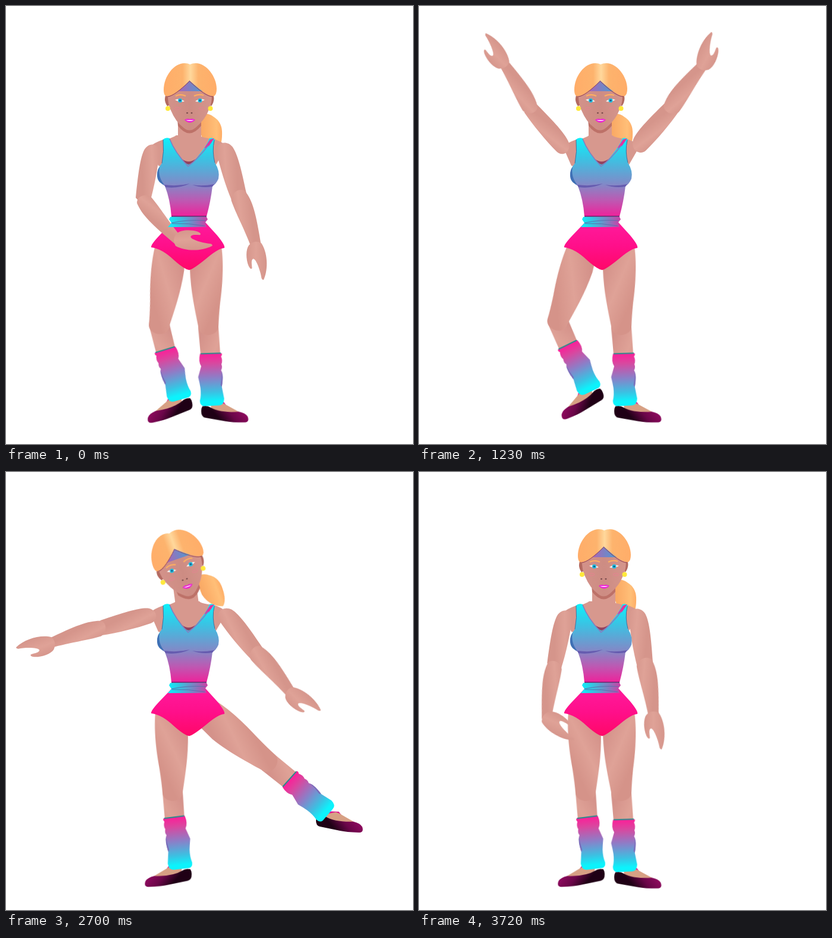
An HTML page that plays this animation: 684x735 px, repeating every 3.75 s.

```html
<!DOCTYPE html>
<html lang="en">
<head>
<meta charset="utf-8">
<title>Aerobics dancer</title>
<style>
html, body { margin: 0; width: 100%; height: 100%; overflow: hidden; background: #fff; }
svg { display: block; width: 684px; height: 735px; }
[class] { animation: 3750ms linear infinite; }

/* Right side: shoulder, elbow, wrist */
.rs { animation-name: rs; }
.re { animation-name: re; }
.rw { animation-name: rw; }
@keyframes rs {
  0% { rotate: -15.9deg; } 12.8% { rotate: -49.4deg; } 32.8% { rotate: -138.3deg; }
  38% { rotate: -158deg; } 46.4% { rotate: -20.8deg; } 61.6% { rotate: -47deg; }
  66.5% { rotate: -53deg; } 83.2%, 100% { rotate: -8.1deg; }
}
@keyframes re {
  0% { rotate: -3.1deg; } 12.8% { rotate: -9.2deg; } 32.8% { rotate: -5deg; }
  46.4% { rotate: -3deg; } 61.6% { rotate: -3.9deg; } 83.2%, 100% { rotate: -1.3deg; }
}
@keyframes rw {
  0% { rotate: 7deg; } 12.8% { rotate: -49.8deg; } 32.8% { rotate: -21.7deg; }
  38% { rotate: -5deg; } 46.4% { rotate: -41deg; } 61.6% { rotate: -33.1deg; }
  83.2%, 100% { rotate: -3.9deg; }
}

/* Left side, drawn mirrored */
.ls { animation-name: ls; }
.le { animation-name: le; }
.lw { animation-name: lw; }
@keyframes ls {
  0% { rotate: -9.5deg; } 12.8% { rotate: -47deg; } 32.8% { rotate: -139deg; }
  41.6% { rotate: -163deg; } 44% { rotate: -148deg; } 46.4% { rotate: -110.8deg; }
  61.6% { rotate: -61.4deg; } 83.2% { rotate: -89.3deg; } 99.2%, 100% { rotate: -11.4deg; }
}
@keyframes le {
  0% { rotate: 50.5deg; } 12.8% { rotate: -17.8deg; } 32.8% { rotate: -10deg; }
  46.4% { rotate: .8deg; } 61.6% { rotate: -2.3deg; } 83.2% { rotate: 5.7deg; }
  99.2%, 100% { rotate: 3.1deg; }
}
@keyframes lw {
  0% { rotate: 41deg; } 12.8% { rotate: -44.6deg; } 32.8% { rotate: 0deg; }
  46.4% { rotate: 13.2deg; } 61.6% { rotate: 29.2deg; } 83.2% { rotate: -50.4deg; }
  99.2%, 100% { rotate: 59.9deg; }
}

/* Hips, knees, ankle */
.rh { animation-name: rh; }
.rk { animation-name: rk; }
.ra { animation-name: ra; }
.lh { animation-name: lh; }
.lk { animation-name: lk; }
@keyframes rh {
  0% { rotate: -1.7deg; } 12.8% { rotate: -10.6deg; } 28.8%, 40% { rotate: -1.7deg; }
  46.4% { rotate: -25deg; } 61.6% { rotate: -74.7deg; } 66.2% { rotate: -88deg; }
  80%, 100% { rotate: -1.7deg; }
}
@keyframes rk {
  0% { rotate: -1deg; } 12.8% { rotate: 15.4deg; } 28.8%, 40% { rotate: -1deg; }
  46.4% { rotate: 17.1deg; } 61.6% { rotate: 16.3deg; } 66.2% { rotate: 5deg; }
  80%, 100% { rotate: -1deg; }
}
@keyframes ra {
  0% { rotate: 2.7deg; } 12.8% { rotate: 3.8deg; } 28.8%, 40% { rotate: 2.7deg; }
  46.4% { rotate: 47.3deg; } 61.6% { rotate: 90.4deg; } 66.2% { rotate: 86deg; }
  80%, 100% { rotate: 2.7deg; }
}
@keyframes lh {
  0% { rotate: -8.5deg; } 12.8% { rotate: -16.2deg; } 32.8% { rotate: -19.5deg; }
  44%, 100% { rotate: 1.3deg; }
}
@keyframes lk {
  0% { rotate: 24.5deg; } 12.8% { rotate: 37.8deg; } 32.8% { rotate: 44.9deg; }
  44%, 100% { rotate: 4.8deg; }
}

.head { animation-name: head; transform-origin: 305px 191px; }
.neck { animation-name: neck; transform-origin: 305px 222px; }
@keyframes head {
  0% { transform: translateX(4px); } 32.8%, 46.4% { transform: none; }
  61.6% { transform: rotate(-20deg); } 83.2% { transform: rotate(-18.4deg); }
  99.2%, 100% { transform: translateX(6px); }
}
@keyframes neck {
  0% { transform: translateX(4px); } 32.8%, 46.4% { transform: none; }
  61.6% { transform: rotate(-8deg); } 83.2% { transform: rotate(-7.4deg); }
  99.2%, 100% { transform: translateX(6px); }
}
</style>
</head>
<body>
<svg viewBox="0 0 684 735" xmlns="http://www.w3.org/2000/svg">
<defs>
  <linearGradient id="armSkin" gradientUnits="userSpaceOnUse" x1="-16" y1="0" x2="18" y2="8">
    <stop stop-color="#d6968c"/><stop offset=".45" stop-color="#dfa297"/><stop offset="1" stop-color="#d5958b"/>
  </linearGradient>
  <linearGradient id="legSkin" gradientUnits="userSpaceOnUse" x1="-26" y1="40" x2="30" y2="66">
    <stop stop-color="#d4928a"/><stop offset=".5" stop-color="#dfa297"/><stop offset="1" stop-color="#d59389"/>
  </linearGradient>
  <linearGradient id="faceSkin" x1="0" x2="1">
    <stop stop-color="#d3928a"/><stop offset=".5" stop-color="#cd8c83"/><stop offset="1" stop-color="#d5958c"/>
  </linearGradient>
  <linearGradient id="hair" gradientUnits="userSpaceOnUse" x1="262" y1="0" x2="350" y2="0">
    <stop stop-color="#ffad69"/><stop offset=".35" stop-color="#fdb36d"/><stop offset=".5" stop-color="#ffd89c"/>
    <stop offset=".65" stop-color="#fdb36d"/><stop offset="1" stop-color="#ffad69"/>
  </linearGradient>
  <linearGradient id="tail" x1="0" x2="1">
    <stop stop-color="#f8a763"/><stop offset=".4" stop-color="#fdb36d"/><stop offset=".75" stop-color="#ffbf78"/><stop offset="1" stop-color="#ffad66"/>
  </linearGradient>
  <linearGradient id="band" x1="0" x2="1">
    <stop stop-color="#b062b4"/><stop offset="1" stop-color="#4e9bd2"/>
  </linearGradient>
  <linearGradient id="top" gradientUnits="userSpaceOnUse" x1="0" y1="222" x2="0" y2="353">
    <stop stop-color="#0ef0fa"/><stop offset=".25" stop-color="#39c4e4"/><stop offset=".58" stop-color="#7f8bc8"/>
    <stop offset=".8" stop-color="#be58b2"/><stop offset="1" stop-color="#ee229a"/>
  </linearGradient>
  <linearGradient id="sash" x1="0" x2="1">
    <stop stop-color="#0cf2fc"/><stop offset=".3" stop-color="#35c4e0"/><stop offset=".7" stop-color="#8679be"/><stop offset="1" stop-color="#d03ca4"/>
  </linearGradient>
  <linearGradient id="shorts" x1="0" y1="0" x2="0" y2="1">
    <stop stop-color="#ff1a9c"/><stop offset=".5" stop-color="#ff0f8a"/><stop offset="1" stop-color="#ff0868"/>
  </linearGradient>
  <linearGradient id="warm" gradientUnits="userSpaceOnUse" x1="0" y1="42" x2="0" y2="130">
    <stop stop-color="#ff1b98"/><stop offset=".2" stop-color="#d9479f"/><stop offset=".48" stop-color="#8b7fc8"/><stop offset=".75" stop-color="#3cc0e2"/><stop offset=".93" stop-color="#0cf3fc"/>
  </linearGradient>
  <linearGradient id="shoe" gradientUnits="userSpaceOnUse" x1="50" y1="8" x2="20" y2="34">
    <stop stop-color="#8f0a5f"/><stop offset=".5" stop-color="#6a0648"/><stop offset="1" stop-color="#1f0015"/>
  </linearGradient>

  <!-- Limb pieces hang down from a joint at the origin; +x is outward -->
  <path id="upper" fill="url(#armSkin)" d="M-15 5C-14-9 6-12 13 4C18 18 17 45 14 86Q2 96-13 90C-16 65-17 30-15 5Z"/>
  <path id="fore" fill="url(#armSkin)" d="M-14 5C-10-7 6-11 13-2C20 18 18 40 9 92H-8C-9 55-14 30-14 5Z"/>
  <path id="hand" fill="url(#armSkin)" d="M-11-4Q0-11 10-3C17 14 13 42 1 58Q-1 59-2 55C-1 44-4 20-9 20C-13 21-13 28-14 35Q-17 38-19 30C-21 18-18 2-11-4Z"/>
  <path id="thigh" fill="url(#legSkin)" d="M-24 0C-22-30 18-28 26 0C29 24 27 60 21 95Q18 118 17 135A17 14 0 0 1-17 133C-21 108-28 75-28 36Z"/>
  <path id="shin" fill="url(#legSkin)" d="M-17 0A17 17 0 0 1 17 0L18 46H-15Z"/>
  <g id="warmer">
    <path fill="url(#warm)" d="M-16 43L20 43.5Q22 46 19 49Q22 56 19 62Q21 68 18 72Q22 80 18 100L21 120Q20 131 12 131H-14Q-20 130-20 122Q-17 112-18 100Q-19 92-21 82L-15 64Q-20 56-16 43Z"/>
    <path fill="#7a6cba" d="M19 74Q22 82 18 100L16 97Q19 85 19 74Z"/>
    <path fill="none" stroke="#278a8c" stroke-width="2" d="M-15 43L19 43.500"/>
  </g>
  <g id="foot">
    <path fill="#e0148c" d="M0-3H20L24 2L2 6Z"/>
    <path fill="#d7a084" d="M-2 2L15-2L21 0L47 14L30 22L0 12Z"/>
    <path fill="url(#shoe)" d="M-16 4Q-8 2-2 6Q14 15 45 13Q56 15 60 21Q64 31 54 31Q34 31 23 29L-11 23Q-18 22-18 12Q-18 7-16 4Z"/>
  </g>
</defs>

<g class="head">
  <path fill="url(#tail)" d="M322 186Q332 176 345 186Q358 194 359 210Q360 235 350 243Q329 236 323 213Z"/>
</g>

<!-- Legs -->
<g transform="translate(277 404) scale(-1 1)"><g class="lh">
  <g transform="translate(0 132)"><g class="lk">
    <g transform="translate(0 128) rotate(-4)"><use href="#foot"/></g>
    <use href="#shin"/><use href="#warmer"/>
  </g></g>
  <use href="#thigh"/>
</g></g>
<g transform="translate(336 404)"><g class="rh">
  <g transform="translate(0 136)"><g class="rk">
    <g transform="translate(0 128)"><g class="ra"><use href="#foot"/></g></g>
    <use href="#shin"/><use href="#warmer"/>
  </g></g>
  <use href="#thigh"/>
</g></g>

<path fill="url(#shorts)" d="M278 364L256 387Q243 401 244 405Q262 407 283 427Q300 442 308 443Q316 441 340 421Q357 407 367 406Q369 402 355 385L335 363Z"/>

<!-- Neck and chest -->
<path class="neck" fill="#d7988e" d="M285 185H324V219Q327 226 320 232H290Q283 226 285 218Z"/>
<path fill="#d7988e" d="M286 217Q280 222 262 225Q250 229 242 236L256 268L300 278L352 268L371 235Q362 227 349 223Q328 221 325 217Z"/>

<!-- Arms; the left one is slimmer -->
<g transform="translate(245 239) scale(-1 1)"><g class="ls">
  <use href="#upper" transform="scale(.92 1)"/>
  <g transform="translate(0 87)"><g class="le">
    <use href="#fore" transform="scale(.92 1)"/>
    <g transform="translate(0 90)"><g class="lw"><use href="#hand"/></g></g>
  </g></g>
</g></g>
<g transform="translate(367 236)"><g class="rs">
  <use href="#upper"/>
  <g transform="translate(0 84)"><g class="re">
    <use href="#fore"/>
    <g transform="translate(0 91)"><g class="rw"><use href="#hand"/></g></g>
  </g></g>
</g></g>

<!-- Top -->
<path fill="#93425f" d="M296 257Q307 265 318 257L307 271Z"/>
<path fill="url(#top)" d="M264 224Q268 220 275 222Q281 238 291 251Q301 265 307 266Q314 264 325 249Q336 236 342 222Q348 220 351 224Q346 243 351 263Q360 277 357 290Q353 299 347 302Q344 328 337 353H278Q276 325 267 302Q256 296 254 284Q254 273 262 264Q265 245 264 224Z"/>
<path fill="#e0349f" d="M343 224L350 222Q344 231 341 235L333 239Z"/>
<path fill="none" stroke="#8879bd" stroke-width="1.5" d="M275 223Q284 246 306 269Q322 257 340 234"/>
<path fill="#3e70b5" d="M258 270Q255 287 266 300Q254 296 254 284Q254 275 258 270Z"/>
<path fill="#655baf" d="M266 300Q288 303 309 298Q289 307 268 304ZM313 300Q330 303 350 299L347 303Q329 306 313 300Z"/>
<path fill="none" stroke="#426f9c" d="M264 224Q266 245 262 264M350 225Q346 244 351 263"/>

<!-- Sash -->
<path fill="url(#sash)" d="M276 354H337L339 358L335 363L337 371H272L278 364L274 358Z"/>
<path fill="none" stroke="#5870ae" d="M278 364Q305 358 335 360M279 365Q307 364 334 369"/>
<path stroke="#491d67" stroke-width="1.5" d="M278 353H337"/>

<!-- Head -->
<g class="head">
  <path fill="#bd7168" d="M284 190L285 201Q304 226 324 201V190Z"/>
  <path fill="#b36a61" d="M265 148Q260 158 267 168L272 166V148ZM344 148Q348 158 341 168L337 164V148Z"/>
  <path fill="url(#faceSkin)" d="M268 140Q267 164 273 175Q281 194 293 203Q304 214 316 203Q331 190 337 174Q343 163 342 140Z"/>
  <g fill="#ffe93b"><circle cx="268" cy="172" r="4"/><circle cx="339.500" cy="172" r="4"/></g>
  <path fill="url(#band)" d="M283 143L304 124L326 143Z"/>
  <path fill="url(#hair)" d="M261 141C261 118 278 96 296 96Q302 96 305 98Q309 96 315 96C333 96 350 119 350 139Q350 148 346 151Q336 154 304.500 125Q277 154 264 151Q261 148 261 141Z"/>
  <path fill="none" stroke="#913f53" d="M268 152Q279 151 304.500 126Q331 152 343 152"/>
  <path fill="none" stroke="#ffb15f" stroke-width="2" d="M281 151Q289 147 298 151M312 151Q321 147 328 150"/>
  <path fill="#fff" d="M280 157.500Q289 154 296 160Q287 162 280 157.500ZM330 157.500Q321 154 314 160Q323 162 330 157.500Z"/>
  <g fill="#20bde0"><circle cx="288.500" cy="158.500" r="3.500"/><circle cx="322" cy="158.500" r="3.500"/></g>
  <g fill="#17517e"><circle cx="288.500" cy="158.500" r="1.500"/><circle cx="322" cy="158.500" r="1.500"/></g>
  <g fill="none" stroke="#e58391"><ellipse cx="284" cy="172" rx="5" ry="2"/><ellipse cx="325" cy="172" rx="5" ry="2"/></g>
  <g fill="#653b3e"><ellipse cx="300.500" cy="179.500" rx="1.500" ry="1"/><ellipse cx="308" cy="179.500" rx="1.500" ry="1"/></g>
  <path fill="#ef17d8" d="M296 191Q301 188 304.500 190Q309 188 314 191Q305 200 296 191Z"/>
  <path fill="#fff" d="M298 191.500H312Q305 194.500 298 191.500Z"/>
</g>
</svg>
</body>
</html>
```
